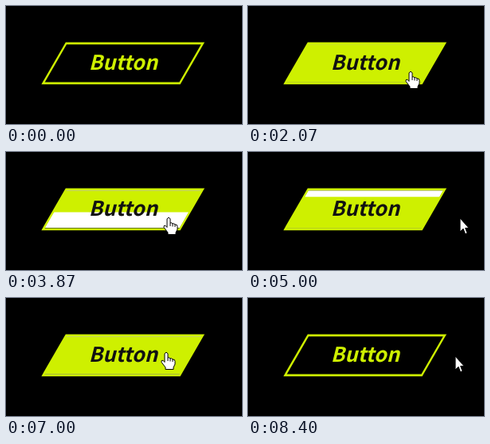
Animation, 296 px wide and 148 px high, one loop 8.67 s. Source, as an HTML page:

```html
<!DOCTYPE html>
<html lang="en">
<head>
<meta charset="utf-8">
<title>Button hover</title>
<style>
  html, body { margin: 0; width: 100%; height: 100%; overflow: hidden; background: #000; }
  svg { display: block; width: 296px; height: 148px; }
  text { font: italic 700 25.5px "Noto Sans CJK JP", "Noto Sans", sans-serif; text-anchor: middle; }
  #cursor path { fill: #fff; stroke: #000; stroke-linejoin: round; }
</style>
</head>
<body>
<svg viewBox="0 0 296 148">
  <g transform="translate(146.7 71.8) skewX(-30)">
    <rect id="white" x="-85" width="170" fill="#fff"/>
    <rect id="lime" x="-85" width="170" fill="#cef000"/>
    <rect x="-85.7" y="-25" width="171.4" height="50" fill="none" stroke="#cef000" stroke-width="2.8"/>
  </g>
  <text id="label" x="147" y="80">Button</text>
  <g id="cursor">
    <path id="arrow" d="M0 0V17L4 13.3L6.5 19.8L9 18.7L6.6 12.4H11Z"/>
    <g id="hand">
      <path d="M-2 2Q0-1.5 2 2V7Q4 6 5 8Q7 7 8 9Q11 8.5 11 11.5V15L9 19V21.5H-1V19L-6 12.5Q-6.5 9.5-4 10.3L-2 12.5Z"/>
      <path d="M2 7v4M5 8v3.5M8 9v3"/>
    </g>
  </g>
</svg>
<script>
const LOOP = 8670, DURATION = 500, DELAY = 130, HEIGHT = 47.2;
const LIME = [206, 240, 0], DARK = [17, 17, 17];

// Each visit: hover times, length of the approach, resting points on and off the button
const visits = [
  { enter: 1300, leave: 2300, approach: 720, on: [204, 82], off: [267, 83] },
  { enter: 3480, leave: 4800, approach: 90, on: [204, 82], off: [266, 83] },
  { enter: 6390, leave: 7720, approach: 340, on: [201, 68], off: [260, 73] }
];
const OUTSIDE = [306, 92];

const el = id => document.getElementById(id);
const clamp = v => Math.min(1, Math.max(0, v));
const mix = (a, b, k) => a.map((v, i) => v + (b[i] - v) * k);
const smooth = x => (x = clamp(x), x * x * (3 - 2 * x));
// Slow ends, very fast middle
const ease = x => (x = clamp(x), x ** 4 / (x ** 4 + (1 - x) ** 4));

// Grows down from the top, shrinks towards the bottom
function setFill(id, amount, leaving, inset = 0) {
  const h = HEIGHT * amount;
  el(id).setAttribute("y", (leaving ? HEIGHT / 2 - h : -HEIGHT / 2) + inset);
  el(id).setAttribute("height", Math.max(0, h - 2 * inset));
}

function drawButton(since, leaving) {
  const progress = [0, DELAY].map(d => ease((since - d) / DURATION));
  const [white, lime] = leaving ? progress.map(p => 1 - p).reverse() : progress;
  const entering = !leaving && since < DURATION + DELAY;
  setFill("white", white, leaving);
  setFill("lime", lime, leaving, entering ? 0.5 : 0);
  el("label").style.fill = `rgb(${mix(LIME, DARK, white).map(Math.round)})`;
}

function drawCursor(t, visit, from, hovering) {
  const arrived = smooth(1 + (t - visit.enter) / visit.approach);
  const left = smooth((t - visit.leave + 200) / 400);
  const [x, y] = mix(mix(from, visit.on, arrived), visit.off, left);
  el("cursor").setAttribute("transform", `translate(${x} ${y})`);
  el("hand").style.display = hovering ? "" : "none";
  el("arrow").style.display = hovering ? "none" : "";
}

function draw(t) {
  const i = Math.max(0, visits.findLastIndex(v => t >= v.enter - v.approach));
  const visit = visits[i], from = i ? visits[i - 1].off : OUTSIDE;
  const leaving = t >= visit.leave;
  drawButton(t - (leaving ? visit.leave : visit.enter), leaving);
  drawCursor(t, visit, from, t >= visit.enter && !leaving);
}

const start = performance.now();
function frame() {
  draw((performance.now() - start) % LOOP);
  requestAnimationFrame(frame);
}
frame();
</script>
</body>
</html>
```
